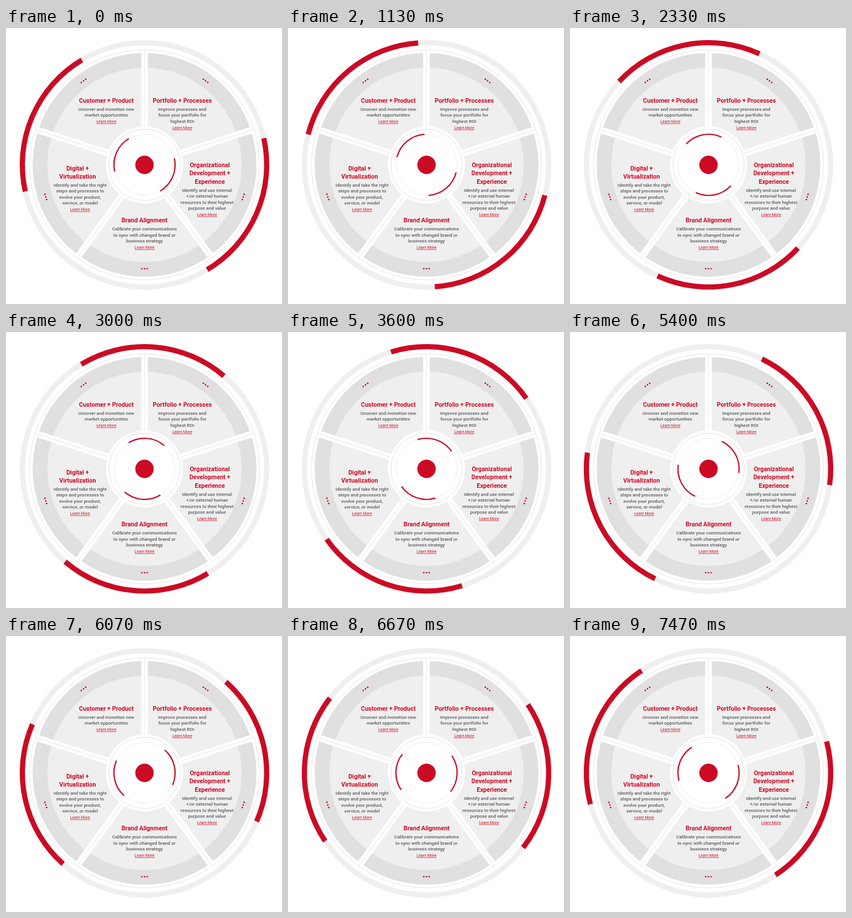
An HTML page for the animation above (7540 ms loop, 480 px wide and 480 px high).

```html
<!DOCTYPE html>
<html lang="en">
<head>
<meta charset="utf-8">
<style>
html, body { margin: 0; width: 100%; height: 100%; overflow: hidden; background: #fff; }
svg { display: block; width: 100%; height: 100%; font-family: Roboto, sans-serif; text-anchor: middle; }
.title { font-size: 10.6px; font-weight: 700; fill: #cc0a24; }
.body { font-size: 8.05px; font-weight: 500; fill: #5a5a5a; }
.link { font-size: 6.85px; fill: #cc0a24; }
</style>
</head>
<body>
<svg id="stage" viewBox="0 0 480 480"></svg>
<script>
const RED = '#cc0a24';
const CX = 240.9, CY = 238;
const LOOP = 7540, STEP = 200 / 3, DEGREES_PER_STEP = 1.586;
const SPAN = 71.7, START = 203.3;
const stage = document.getElementById('stage');

function add(parent, tag, attrs, text) {
  const node = document.createElementNS('http://www.w3.org/2000/svg', tag);
  for (const key in attrs) node.setAttribute(key, attrs[key]);
  if (text) node.textContent = text;
  parent.appendChild(node);
  return node;
}

function polar(radius, degrees) {
  const a = degrees * Math.PI / 180;
  return [radius * Math.cos(a), radius * Math.sin(a)];
}

const wheel = add(stage, 'g', { transform: `translate(${CX} ${CY})` });

function ring(r, width, stroke, fill = 'none') {
  add(wheel, 'circle', { r, fill, stroke, 'stroke-width': width });
}

function spoke(angle, from, to, width, stroke) {
  const [x1, y1] = polar(from, angle), [x2, y2] = polar(to, angle);
  add(wheel, 'line', { x1, y1, x2, y2, stroke, 'stroke-width': width });
}

function arc(parent, radius, width, middle) {
  const from = polar(radius, middle - SPAN / 2), to = polar(radius, middle + SPAN / 2);
  add(parent, 'path', {
    d: `M${from} A${radius} ${radius} 0 0 1 ${to}`,
    fill: 'none', stroke: RED, 'stroke-width': width
  });
}

// Fixed wheel
ring(212.4, 9, '#efefef');
ring(200, 1, '#e6e6e6', '#fff');
add(wheel, 'circle', { r: 194.5, fill: '#e0e0e0' });
add(wheel, 'circle', { r: 169, fill: '#efefef' });
for (let i = 0; i < 5; i++) {
  const angle = i * 72 - 90;
  spoke(angle, 60, 197, 11.5, '#fff');
  spoke(angle, 62, 200, 1, '#e6e6e6');
  const [x, y] = polar(180.5, angle + 36);
  const [dx, dy] = polar(4.8, angle + 126);
  for (const k of [-1, 0, 1])
    add(wheel, 'circle', { cx: x + k * dx, cy: y + k * dy, r: 1.35, fill: RED });
}
add(wheel, 'circle', { r: 67, fill: '#fff' });
ring(62, 1, '#e2e2e2');
ring(53, 1, '#eeeeee');
add(wheel, 'circle', { r: 16, fill: RED });

// Rotating arcs
const spinner = add(wheel, 'g', {});
for (const middle of [START, START + 180]) {
  arc(spinner, 212.5, 9, middle);
  arc(spinner, 53.2, 2.2, middle);
}

// Labels
function label(titleX, titleY, titles, bodyX, bodyY, lines) {
  titles.forEach((s, i) => add(stage, 'text', { x: titleX, y: titleY + i * 14.3, class: 'title' }, s));
  lines.forEach((s, i) => add(stage, 'text', { x: bodyX, y: bodyY + i * 10.45, class: 'body' }, s));
  const y = bodyY + lines.length * 10.45 + 0.5;
  add(stage, 'text', { x: bodyX, y, class: 'link' }, 'Learn More');
  add(stage, 'rect', { x: bodyX - 17.4, y: y + 0.9, width: 34.8, height: 0.7, fill: RED });
}

label(174.5, 129.9, ['Customer + Product'], 174.5, 144,
  ['Uncover and monetize new', 'market opportunities']);
label(306.6, 129.9, ['Portfolio + Processes'], 306.6, 144,
  ['Improve processes and', 'focus your portfolio for', 'highest ROI']);
label(124.5, 247.9, ['Digital +', 'Virtualization'], 128.9, 275.8,
  ['Identify and take the right', 'steps and processes to', 'evolve your product,', 'service, or model']);
label(354.5, 242, ['Organizational', 'Development +', 'Experience'], 349.6, 284.6,
  ['Identify and use internal', '+/or external human', 'resources to their highest', 'purpose and value']);
label(241, 337.9, ['Brand Alignment'], 240.9, 352.2,
  ['Calibrate your communications', 'to sync with changed brand or', 'business strategy']);

// Motion advances in steps of a fifteenth of a second, on a 10 ms grid
function draw(ms) {
  const tick = Math.floor((ms % LOOP) / 10) * 10;
  const step = Math.floor((tick + 5) / STEP);
  spinner.setAttribute('transform', `rotate(${step * DEGREES_PER_STEP})`);
}

const began = performance.now();
function frame() {
  draw(performance.now() - began);
  requestAnimationFrame(frame);
}
draw(0);
requestAnimationFrame(frame);
</script>
</body>
</html>
```
